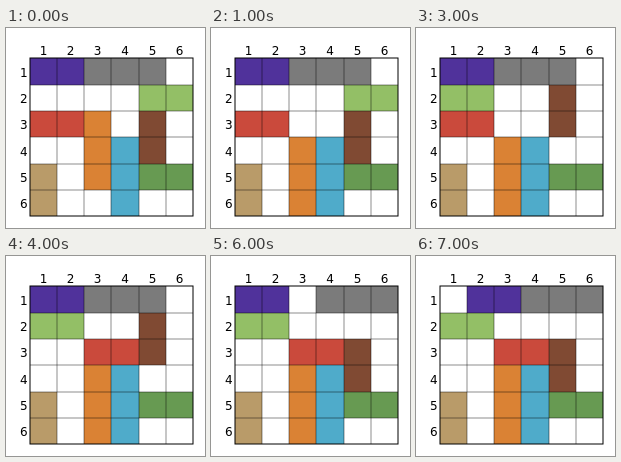
These frames come from a looping animation (199x200 px, 8000 ms). An HTML page with a canvas:

```html
<!DOCTYPE html>
<html lang="en">
<head>
<meta charset="utf-8">
<title>Sliding blocks</title>
<style>
  html, body { margin: 0; width: 100%; height: 100%; overflow: hidden; background: #fff; }
  canvas { display: block; width: 100%; height: 100%; }
</style>
</head>
<body>
<canvas id="stage" width="199" height="200"></canvas>
<script>
const ctx = document.getElementById('stage').getContext('2d');
const STEP = 1000, STEPS = 8;

// Cell edges, rounded to whole pixels
const colX = c => Math.round(23.9 + 27.19 * c);
const rowY = r => Math.round(30.2 + 26.35 * r);

// at and size in cells; moves: [step, column, row]
const blocks = [
  { color: '#50329b', at: [0, 0], size: [2, 1], moves: [[7, 1, 0]] },
  { color: '#7b7b7b', at: [2, 0], size: [3, 1], moves: [[6, 3, 0]] },
  { color: '#93bf66', at: [4, 1], size: [2, 1], moves: [[2, 0, 1]] },
  { color: '#ca4a3c', at: [0, 2], size: [2, 1], moves: [[4, 2, 2]] },
  { color: '#da8234', at: [2, 2], size: [1, 3], moves: [[1, 2, 3]] },
  { color: '#804a33', at: [4, 2], size: [1, 2], moves: [[3, 4, 1], [5, 4, 2]] },
  { color: '#4fabca', at: [3, 3], size: [1, 3], moves: [] },
  { color: '#679a52', at: [4, 4], size: [2, 1], moves: [] },
  { color: '#b99b69', at: [0, 4], size: [1, 2], moves: [] },
];

function drawBlock({ color, at, size, moves }, step) {
  let [c, r] = at;
  for (const [when, col, row] of moves) if (step >= when) [c, r] = [col, row];
  const x = colX(c), y = rowY(r);
  ctx.fillStyle = color;
  ctx.fillRect(x, y, colX(c + size[0]) - x, rowY(r + size[1]) - y);
}

// Lines run along the cell edges, so each softens over two pixels
function drawGrid() {
  const left = colX(0), right = colX(6), top = rowY(0), bottom = rowY(6);
  ctx.beginPath();
  for (let i = 1; i < 6; i++) {
    ctx.moveTo(colX(i), top);
    ctx.lineTo(colX(i), bottom);
    ctx.moveTo(left, rowY(i));
    ctx.lineTo(right, rowY(i));
  }
  ctx.strokeStyle = 'rgba(0, 0, 0, 0.45)';
  ctx.stroke();
  ctx.strokeStyle = '#000';
  ctx.strokeRect(left, top, right - left, bottom - top);
}

function drawLabels() {
  ctx.fillStyle = '#000';
  ctx.font = '12px "DejaVu Sans", sans-serif';
  ctx.textAlign = 'center';
  for (let i = 0; i < 6; i++) {
    ctx.fillText(i + 1, (colX(i) + colX(i + 1)) / 2, 27);
    ctx.fillText(i + 1, 17.7, Math.round((rowY(i) + rowY(i + 1)) / 2 + 5));
  }
}

function draw() {
  const step = Math.floor(performance.now() / STEP) % STEPS;
  ctx.fillStyle = '#fff';
  ctx.fillRect(0, 0, 199, 200);
  blocks.forEach(block => drawBlock(block, step));
  drawGrid();
  drawLabels();
  requestAnimationFrame(draw);
}
draw();
</script>
</body>
</html>
```
